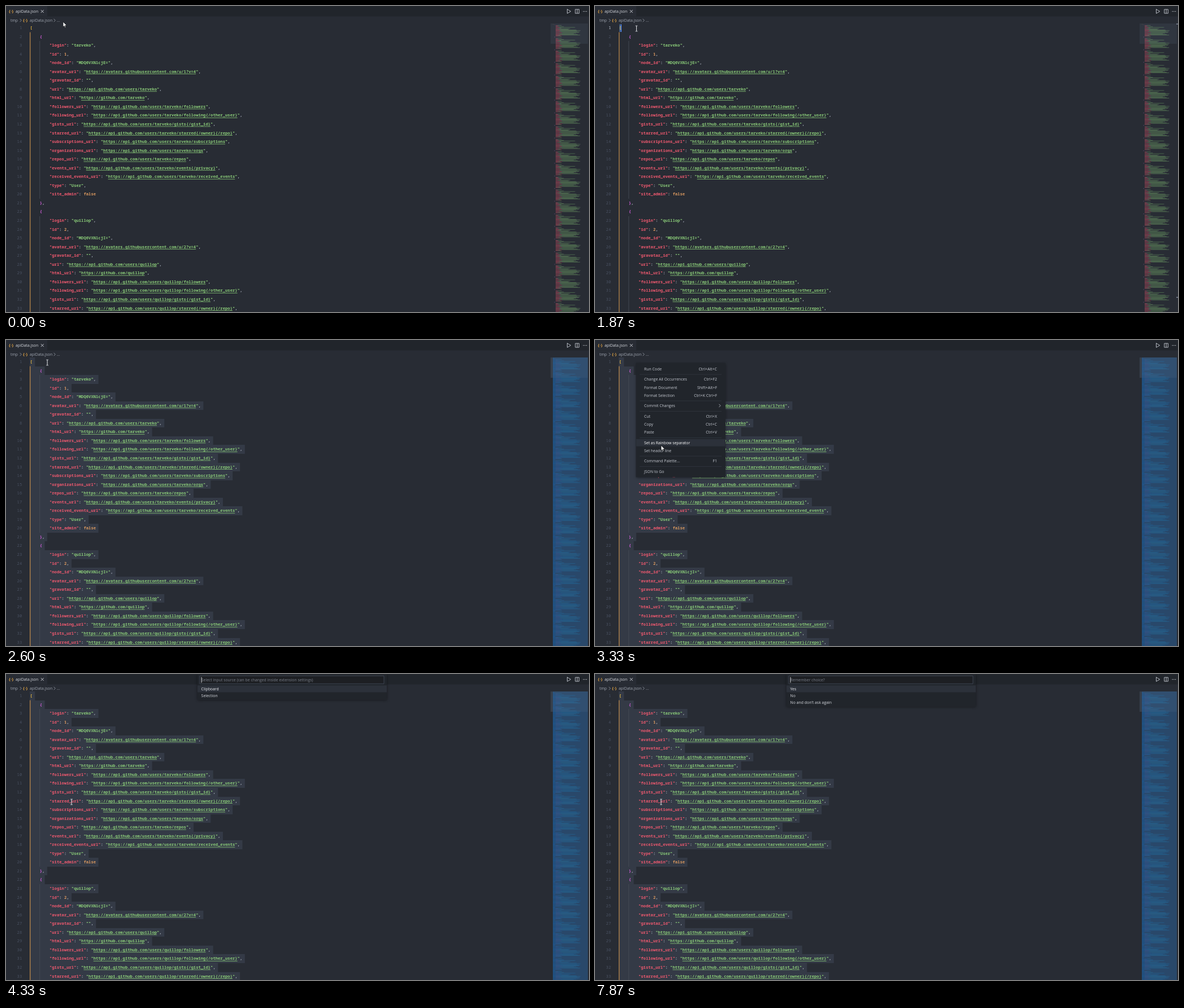
These frames come from a looping animation (1032x543 px, 8 s). An HTML page with a canvas:

```html
<!DOCTYPE html>
<html lang="en">
<head>
<meta charset="utf-8">
<title>apiData.json</title>
<style>
html, body { margin: 0; width: 100%; height: 100%; overflow: hidden; background: #282c34; }
canvas { display: block; width: 1032px; height: 543px; }
</style>
</head>
<body>
<canvas id="stage"></canvas>
<script>
const W = 1032, H = 543, LOOP = 8000, TICK = 200 / 3;
const canvas = document.getElementById('stage');
const ctx = canvas.getContext('2d');
const dpr = window.devicePixelRatio || 1;
canvas.width = W * dpr;
canvas.height = H * dpr;

const MONO = '"Noto Sans Mono", "DejaVu Sans Mono", monospace';
const SANS = '"Open Sans", "Noto Sans", sans-serif';
const C = {
  bg: '#282c34', bar: '#21252b', red: '#ef596f', green: '#89ca78', orange: '#d8985f',
  grey: '#abb2bf', gold: '#e5b840', pink: '#d55fde', dim: '#495162', light: '#d7dae0',
  hover: '#2c313a'
};
const CW = 4.32, X0 = 42.4, ROW = 15.547, Y0 = 38.5;

function rect(x, y, w, h, color) {
  ctx.fillStyle = color;
  ctx.fillRect(x, y, w, h);
}

// Laid out at ten times the size so that glyph advances stay fractional.
function text(s, x, y, color, o = {}) {
  ctx.save();
  ctx.translate(x, y);
  ctx.scale(0.1, 0.1);
  ctx.font = `${o.weight || 400} ${(o.size || 6.88) * 10}px ${o.font || SANS}`;
  ctx.textAlign = o.align || 'left';
  ctx.textBaseline = 'alphabetic';
  ctx.fillStyle = color;
  ctx.fillText(s, 0, 0);
  const w = ctx.measureText(s).width / 10;
  ctx.restore();
  return w;
}

function code(s, x, y, color, o = {}) {
  text(s, x, y + 2.5, color, { font: MONO, size: 7.2, weight: 600, ...o });
}

function path(points, stroke, width, fill) {
  ctx.beginPath();
  points.forEach(([x, y], i) => i ? ctx.lineTo(x, y) : ctx.moveTo(x, y));
  if (fill) { ctx.closePath(); ctx.fillStyle = fill; ctx.fill(); }
  if (stroke) { ctx.strokeStyle = stroke; ctx.lineWidth = width; ctx.stroke(); }
}

// Each line: indent and parts of [text, colour, isLink].
function field(key, value, last) {
  const parts = [[`"${key}"`, C.red], [': ', C.grey]];
  if (typeof value !== 'string') parts.push([String(value), C.orange]);
  else if (value.startsWith('http')) parts.push(['"', C.green], [value, C.green, true], ['"', C.green]);
  else parts.push([`"${value}"`, C.green]);
  if (!last) parts.push([',', C.grey]);
  return { indent: 8, parts };
}

function user(name, id) {
  const site = 'https://api.github.com/users/' + name;
  const sub = (key, tail) => field(key + '_url', site + '/' + tail);
  return [
    { indent: 4, parts: [['{', C.pink]] },
    field('login', name),
    field('id', id),
    field('node_id', 'MDQ6VXNlcj' + (id === 1 ? 'E=' : 'I=')),
    field('avatar_url', `https://avatars.githubusercontent.com/u/${id}?v=4`),
    field('gravatar_id', ''),
    field('url', site),
    field('html_url', 'https://github.com/' + name),
    sub('followers', 'followers'),
    sub('following', 'following{/other_user}'),
    sub('gists', 'gists{/gist_id}'),
    sub('starred', 'starred{/owner}{/repo}'),
    sub('subscriptions', 'subscriptions'),
    sub('organizations', 'orgs'),
    sub('repos', 'repos'),
    sub('events', 'events{/privacy}'),
    sub('received_events', 'received_events'),
    field('type', 'User'),
    field('site_admin', false, true),
    { indent: 4, parts: [['}', C.pink], [',', C.grey]] }
  ];
}

const block = user('tarveko', 1);
const lines = [{ indent: 0, parts: [['[', C.gold]] }, ...block, ...user('quillop', 2)].slice(0, 33);
const lengthOf = l => l.indent + l.parts.reduce((n, p) => n + p[0].length, 0);

function drawLine(line, y) {
  let x = X0 + line.indent * CW;
  for (const [s, color, link] of line.parts) {
    code(s, x, y, color);
    const w = s.length * CW;
    if (link) rect(x, y + 4, w, 0.8, C.green);
    x += w;
  }
}

function drawEditor(t) {
  const clicked = t >= 1870 && t < 2130;
  if (t >= 2130) {
    const color = t < 2600 ? '#404859' : '#343a46';
    lines.forEach((l, i) => {
      const y = Math.round(31 + i * ROW);
      rect(42, y, lengthOf(l) * CW + 5, Math.round(31 + (i + 1) * ROW) - y, color);
    });
  }
  if (clicked) rect(43, 32.5, 4, 13.5, '#41618f');

  rect(59.4, 62, 0.8, 280, '#484d58');
  rect(59.4, 373, 0.8, 170, '#484d58');
  rect(42.2, 46.5, 1.1, H, '#cf954e');

  lines.forEach((l, i) => {
    const y = Y0 + i * ROW;
    code(String(i + 1), 28.2, y, clicked && !i ? '#c3c9d4' : C.dim, { align: 'right', weight: 400 });
    drawLine(l, y);
  });
  if (clicked) {
    rect(46, 32.5, 1, 13.5, '#528bff');
    rect(1029, 31, 3, 2, '#6b7280');
    rect(1029, 516, 3, 2, '#6b7280');
  }
}

function drawMinimap(selected) {
  const x0 = 968.5, cw = 0.555, step = 1.12;
  rect(964, 31, 66, 36, 'rgba(120,135,165,0.10)');
  if (selected) rect(968, 31, 62, H, '#29486a');
  for (let i = 0; i < 457; i++) {
    const y = 32 + i * step;
    const line = i ? block[(i - 1) % 20] : lines[0];
    let x = x0 + line.indent * cw;
    if (selected) rect(968, y, lengthOf(line) * cw + 1, step, '#205283');
    ctx.globalAlpha = selected ? 0.09 : 0.43;
    for (const [s, color] of line.parts) {
      rect(x, y, s.length * cw, 0.8, color);
      x += s.length * cw;
    }
    ctx.globalAlpha = 1;
  }
  if (selected) rect(964, 31, 66, 36, 'rgba(120,135,165,0.10)');
}

function braces(x, y) {
  text('{', x, y + 2.4, '#dca043', { weight: 700, size: 7 });
  text('}', x + 5.6, y + 2.4, '#dca043', { weight: 700, size: 7 });
  rect(x + 3.8, y - 0.3, 1, 1, '#dca043');
}

function chevron(x, y, color) {
  path([[x, y - 2.7], [x + 2.6, y], [x, y + 2.7]], color, 0.8);
}

function drawHeader() {
  rect(0, 0, W, 18.5, C.bar);
  rect(0, 0, 73, 18.5, C.bg);
  braces(5, 9.5);
  text('apiData.json', 17, 12, C.light);
  path([[61.8, 7], [66.8, 12]], C.light, 0.9);
  path([[66.8, 7], [61.8, 12]], C.light, 0.9);
  path([[993.5, 5.8], [999.8, 9.5], [993.5, 13.2], [993.5, 5.3]], '#c5c9d1', 0.9);
  ctx.strokeStyle = '#c5c9d1';
  ctx.lineWidth = 0.9;
  ctx.strokeRect(1007.8, 6, 6.6, 7);
  rect(1010.7, 6, 0.9, 7, '#c5c9d1');
  for (let i = 0; i < 3; i++) rect(1021.6 + i * 2.7, 9, 1.2, 1.2, '#c5c9d1');

  text('tmp', 8, 28, '#a0a6b1');
  chevron(24.6, 25.5, '#a0a6b1');
  braces(30, 25.5);
  text('apiData.json', 42, 28, '#a0a6b1');
  chevron(84.6, 25.5, '#a0a6b1');
  text('...', 90, 28, '#a0a6b1');
}

const menu = [
  [51.5, 'Run Code', 'Ctrl+Alt+C'],
  [70, 'Change All Occurrences', 'Ctrl+F2'],
  [84.2, 'Format Document', 'Shift+Alt+F'],
  [98.3, 'Format Selection', 'Ctrl+K Ctrl+F'],
  [117, 'Commit Changes', '>'],
  [135.3, 'Cut', 'Ctrl+X'],
  [149.5, 'Copy', 'Ctrl+C'],
  [163.6, 'Paste', 'Ctrl+V'],
  [182.3, 'Set as Rainbow separator', ''],
  [196.4, 'Set header line', ''],
  [215, 'Command Palette...', 'F1'],
  [233.5, 'JSON to Go', '']
];

function panel(x, y, w, h) {
  ctx.save();
  ctx.shadowColor = 'rgba(0,0,0,0.45)';
  ctx.shadowBlur = 5 * dpr;
  ctx.shadowOffsetY = dpr;
  rect(x, y, w, h, C.bar);
  ctx.restore();
}

function drawMenu(mouseY) {
  panel(72.5, 40.5, 158.5, 203);
  menu.forEach(([y, label, keys], i) => {
    const on = Math.abs(y - mouseY) < 7;
    const color = on ? '#ffffff' : '#c6cad2';
    if (on) rect(73, y - 6.5, 157.5, 12.8, C.hover);
    text(label, 87, y + 2.4, color);
    if (keys === '>') chevron(219.5, y - 0.5, color);
    else text(keys, 216, y + 2.4, color, { align: 'right', size: 7 });
    const next = menu[i + 1];
    if (next && next[0] - y > 16) rect(79, (y + next[0]) / 2, 145, 0.7, '#343942');
  });
}

function drawPicker(t) {
  const second = t >= 6670;
  const typed = second || t < 5730 ? '' : t < 5930 ? 's' : t < 6130 ? 'se' : 'sel';
  const hint = second ? 'Remember choice?' : 'Select input source (can be changed inside extension settings)';
  let rows = typed ? ['Selection'] : ['Clipboard', 'Selection'];
  if (second) rows = t < 6800 ? [] : ['Yes', 'No', "No and don't ask again"];

  panel(339, 0, 335, 22 + rows.length * 12.1);
  rect(343, 3.3, 326, 14, '#1d1f23');
  ctx.strokeStyle = '#454d5c';
  ctx.lineWidth = 0.8;
  ctx.strokeRect(343, 3.3, 326, 14);
  let caret = 345.6;
  if (typed) caret += text(typed, 345.6, 13, C.light) + 0.3;
  else text(hint, 345.8, 13, '#7b808b');

  const hidden = (t >= 4870 && t < 5400) || t >= 7330 && t < 7870;
  if (!hidden) rect(caret, 5.5, 0.9, 10, '#e4e7ec');

  rows.forEach((label, i) => {
    const y = 26.4 + i * 12.15;
    if (!i) rect(339, y - 6.2, 335, 12.2, C.hover);
    const n = typed.length;
    const w = n ? text(label.slice(0, n), 345.6, y + 2.5, '#ffffff', { weight: 700 }) : 0;
    text(label.slice(n), 345.6 + w, y + 2.5, i ? C.light : '#eceef2');
  });
}

// Pointer track: time, x, y.
const track = [
  [0, 101, 28], [333, 101, 28], [400, 97, 37], [467, 93.5, 41], [533, 91.5, 43.5], [600, 90, 44.5],
  [733, 90, 44.5], [800, 89.5, 44.5], [1333, 89.5, 44.5], [1533, 80, 42], [1733, 73.5, 40],
  [2867, 73, 40], [3000, 87, 85], [3133, 105, 138], [3333, 117, 187], [3533, 118, 211],
  [3733, 117, 222], [4067, 116, 227], [4467, 116, 227], [4600, 117, 227], [LOOP, 117, 227]
];

function pointerAt(t) {
  const i = track.findIndex(k => k[0] > t);
  const [t0, x0, y0] = track[i - 1], [t1, x1, y1] = track[i];
  const p = (t - t0) / (t1 - t0);
  return [x0 + (x1 - x0) * p, y0 + (y1 - y0) * p];
}

function drawPointer(x, y, arrow) {
  if (arrow) {
    const shape = [[0, 0], [0, 9.2], [2.1, 7.3], [3.6, 10.6], [5, 10], [3.6, 6.8], [6.5, 6.6]];
    ctx.lineJoin = 'round';
    path([...shape, [0, 0]].map(([a, b]) => [x + a, y + b]), '#15171b', 0.8, '#ffffff');
    return;
  }
  rect(x - 0.5, y - 5, 1, 10, '#e8eaee');
  rect(x - 2, y - 5.3, 4, 0.8, '#d4d7de');
  rect(x - 2, y + 4.5, 4, 0.8, '#d4d7de');
}

function draw(tick) {
  const t = tick * TICK + 7;
  const [x, y] = pointerAt(tick * TICK + 0.5);
  const menuOpen = t >= 2670 && t < 4330;
  ctx.setTransform(dpr, 0, 0, dpr, 0, 0);
  rect(0, 0, W, H, C.bg);
  drawEditor(t);
  drawMinimap(t >= 2130);
  drawHeader();
  if (menuOpen) drawMenu(y);
  if (t >= 4330) drawPicker(t);
  drawPointer(x, y, menuOpen || t < 400);
}

const start = performance.now();
let shown = -1;
function frame() {
  const t = (performance.now() - start) % LOOP;
  const tick = Math.floor((t + 7) / TICK) % 120;
  if (tick !== shown) draw(shown = tick);
  requestAnimationFrame(frame);
}
frame();
</script>
</body>
</html>
```
